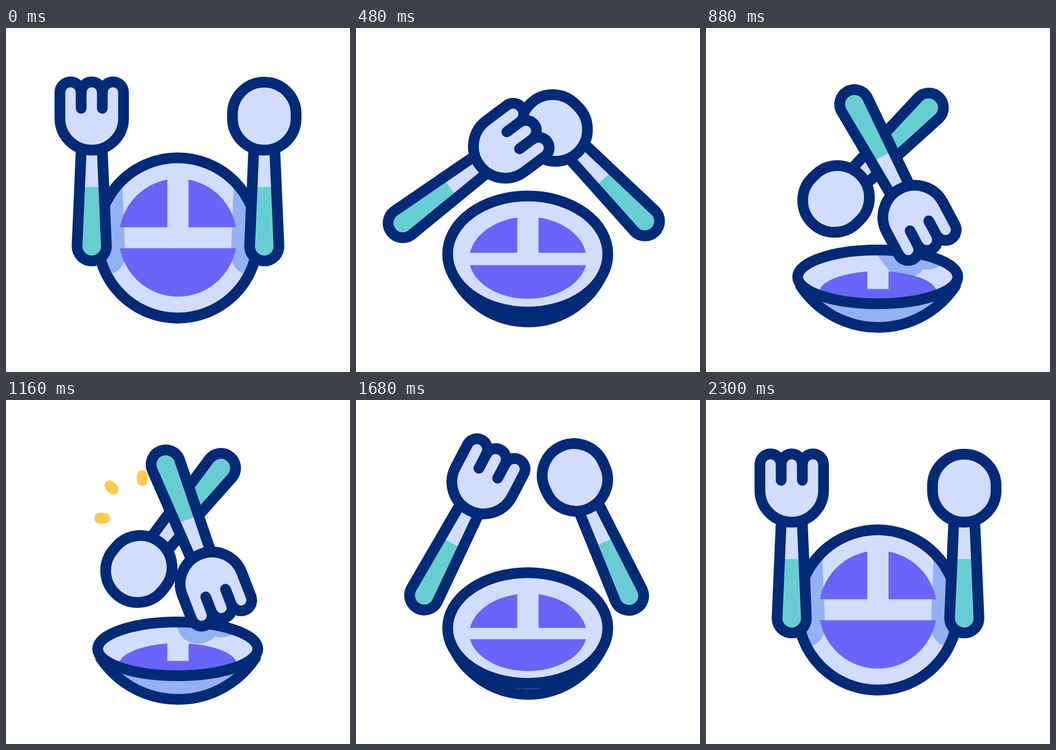
Write an HTML page that moves like this. It is 640x640 px and loops after 2.4 s.

```html
<!DOCTYPE html>
<html lang="en">
<head>
<meta charset="utf-8">
<title>Plate, fork and spoon</title>
<style>
html, body { margin: 0; width: 100%; height: 100%; overflow: hidden; background: #fff; }
svg { display: block; width: 100vw; height: 100vh; }
.line { stroke: #032a76; stroke-width: 20; stroke-linecap: round; stroke-linejoin: round; }
.light { fill: #d2ddfd; }
.blue { fill: #93b1f3; }
.teal { fill: #68cdd2; }
.purple { fill: #6865f8; }
.none { fill: none; }
.shade { fill: #93b1f3; stroke: #93b1f3; stroke-width: 20; stroke-linejoin: round; }
.spark { stroke: #ffcb50; stroke-linecap: round; }
</style>
</head>
<body>
<svg viewBox="0 0 640 640">
  <defs>
    <path id="handle" d="M-19 45L-27.3 238A27.3 27.3 0 0 0 27.3 238L19 45Z"/>
    <path id="forkHead" d="M-59.2 -48a19.73 19.73 0 0 1 39.47 0a19.73 19.73 0 0 1 39.46 0a19.73 19.73 0 0 1 39.47 0V0a59.2 59.2 0 0 1 -118.4 0Z"/>
    <path id="spoonHead" d="M-59.2 -8a59.2 59.2 0 0 1 118.4 0V0a59.2 59.2 0 0 1 -118.4 0Z"/>
    <g id="grip">
      <use href="#handle" class="light"/>
      <path class="teal" d="M-22.6 128L-27.3 238A27.3 27.3 0 0 0 27.3 238L22.6 128Z"/>
      <use href="#handle" class="line none"/>
    </g>
    <clipPath id="inside"><ellipse id="clip"/></clipPath>
  </defs>
  <path id="body" class="line blue"/>
  <ellipse id="base" class="light"/>
  <g clip-path="url(#inside)">
    <g id="forkShade" class="shade"><use href="#handle"/><use href="#forkHead"/></g>
    <g id="spoonShade" class="shade"><use href="#handle"/><use href="#spoonHead"/></g>
  </g>
  <path id="food" class="purple"/>
  <ellipse id="rim" class="line none"/>
  <g id="sparks" class="spark"><line/><line/><line/></g>
  <g id="spoon"><use href="#grip"/><use href="#spoonHead" class="line light"/></g>
  <g id="fork">
    <use href="#grip"/><use href="#forkHead" class="line light"/>
    <path class="line none" d="M-19.73 -48V-18.5M19.73 -48V-18.5"/>
  </g>
</svg>
<script>
const LOOP = 2400, CX = 319.5;
const el = id => document.getElementById(id);
const set = (node, attrs) => { for (const k in attrs) node.setAttribute(k, attrs[k]); };
const clamp = v => Math.max(0, Math.min(1, v));
const mix = (a, b, k) => a + (b - a) * k;
const ease = (t, from, to) => {
  const u = clamp((t - from) / (to - from));
  return u * u * (3 - 2 * u);
};
const bezier = (a, b, c, d, s) => {
  const v = 1 - s;
  return v * v * v * a + 3 * v * v * s * b + 3 * v * s * s * c + s * s * s * d;
};

// Head position and angle: rest, wind-up, over the bowl; "out" and "back" bend the two swings
const tools = {
  fork: {
    side: 1, rest: [159.5, 168, 0], wind: [89.6, 127.8, -14.7], over: [383.3, 342, 158.8],
    out: [[260, 110], [434, 440]], back: [[430, 307], [318, 93]]
  },
  spoon: {
    side: -1, rest: [480.5, 168, 0], wind: [562.5, 111, 17.9], over: [249.7, 311.3, -140.9],
    out: [[400, 105], [199, 356]], back: [[231, 262], [336, 89]]
  }
};

function swing(from, [c1, c2], to, s) {
  return [
    bezier(from[0], c1[0], c2[0], to[0], s),
    bezier(from[1], c1[1], c2[1], to[1], s),
    mix(from[2], to[2], s)
  ];
}

function pose(tool, t) {
  const { rest, wind, over, out, back } = tool;
  if (t < 300) return rest.map((v, i) => mix(v, wind[i], ease(t, 0, 300)));
  if (t < 1300) return swing(wind, out, over, .92 * ease(t, 300, 700) + .08 * ease(t, 600, 1160));
  return swing(over, back, rest, ease(t, 1307, 1815));
}

function drawTool(id, t, p) {
  const [x, y, a] = pose(tools[id], t);
  set(el(id), { transform: `translate(${x} ${y}) rotate(${a})` });
  // The shadow flattens as the bowl tilts
  const k = clamp((p - .06) / .74);
  const dx = mix(25 * tools[id].side, -3, k), dy = mix(16, 40, k);
  set(el(id + "Shade"), { transform:
    `translate(${x + dx} ${y + dy}) scale(${mix(1, 1.16, k)} ${mix(1, .8, k)}) rotate(${a})` });
}

function drawBowl(p) {
  const cy = 390.5 + 72.5 * p, ry = 149 - 99 * p;
  const oval = (id, d) => set(el(id), { cx: CX, cy, rx: 149 - d, ry: ry - d });
  oval("base", 0); oval("rim", 0); oval("clip", 5);

  const r = 149 + 24 * p * p, half = 144, mid = CX + .5 * p;
  const y = 539.5 + 17.5 * p - r + Math.sqrt(r * r - half * half);
  set(el("body"), { d: `M${mid - half} ${y}A${r} ${r} 0 0 0 ${mid + half} ${y}` });

  const top = 282 + 171 * p, up = 370.8 + 114.7 * p;
  const low = 409.8 + 75.7 * p, end = 500 + 9.5 * p;
  const c = CX + .4, w = 107.9, g = 19.7, R = 109.8;
  const ru = R * (up - top) / 88.4, rl = R * (end - low) / 89.6;
  const slice = (side, sweep) =>
    `M${c + side * w} ${up}A${R} ${ru} 0 0 ${sweep} ${c + side * g} ${top}V${up}Z`;
  set(el("food"), { d: slice(-1, 1) + slice(1, 0) +
    `M${c - w} ${low}A${R} ${rl} 0 0 0 ${c + w} ${low}Z` });
}

// Three short strokes fly out of one point and fade in width
function drawSparks(t) {
  const u = clamp((t - 1060) / 200), len = 9.5 * Math.sin(Math.PI * u);
  set(el("sparks"), {
    visibility: u > 0 && u < 1 ? "visible" : "hidden",
    "stroke-width": 20 * Math.min(1, 4 * u, 4 * (1 - u))
  });
  [...el("sparks").children].forEach((line, i) => {
    const a = Math.PI * (1 + i / 4), r = 45 + 50 * u + 6 * (i % 2);
    const x = d => 253.5 + d * Math.cos(a), y = d => 220 + d * Math.sin(a);
    set(line, { x1: x(r), y1: y(r), x2: x(r + len), y2: y(r + len) });
  });
}

function draw(t) {
  const p = ease(t, 200, 833) - ease(t, 1380, 1953);
  drawBowl(p);
  drawTool("fork", t, p);
  drawTool("spoon", t, p);
  drawSparks(t);
}

let start;
function tick(now) {
  if (start === undefined) start = now;
  draw((now - start) % LOOP);
  requestAnimationFrame(tick);
}
draw(0);
requestAnimationFrame(tick);
</script>
</body>
</html>
```
